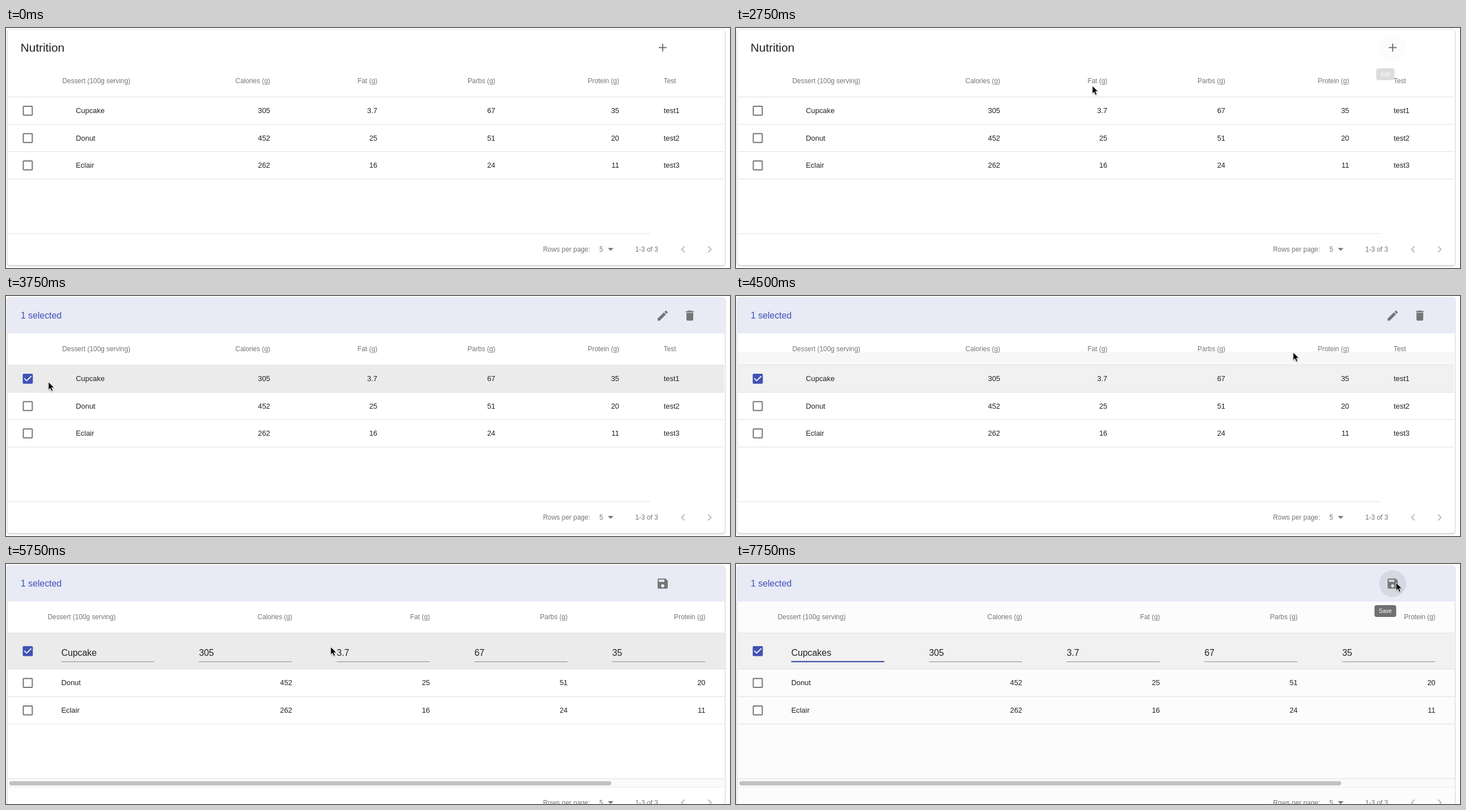
Write an HTML page that moves like this. It is 1280x426 px and loops after 8 s.

```html
<!DOCTYPE html>
<html lang="en">
<head>
<meta charset="utf-8">
<title>Nutrition table</title>
<style>
  html, body { margin: 0; width: 100%; height: 100%; overflow: hidden; background: #fff; }
  svg { display: block; width: 100%; height: 100%; font-family: "Liberation Sans", Arial, sans-serif; }
  .card { filter: drop-shadow(0 1px 1px rgba(0,0,0,.28)); }
  .cursor { filter: drop-shadow(0 1px 1px rgba(0,0,0,.3)); }
</style>
</head>
<body>
<svg id="stage" viewBox="0 0 1280 426"></svg>
<script>
const STEP = 250, STEPS = 32;
const INK = '#212121', MUTED = '#757575', LINE = '#e0e0e0', PRIMARY = '#3f51b5';

const ICONS = {
  add: 'M19 13h-6v6h-2v-6H5v-2h6V5h2v6h6v2z',
  edit: 'M3 17.25V21h3.75L17.81 9.94l-3.75-3.75L3 17.25zM20.71 7.04c.39-.39.39-1.02 0-1.41l-2.34-2.34c-.39-.39-1.02-.39-1.41 0l-1.83 1.83 3.75 3.75 1.83-1.83z',
  remove: 'M6 19c0 1.1.9 2 2 2h8c1.1 0 2-.9 2-2V7H6v12zM19 4h-3.5l-1-1h-5l-1 1H5v2h14V4z',
  save: 'M17 3H5c-1.11 0-2 .9-2 2v14c0 1.1.89 2 2 2h14c1.1 0 2-.9 2-2V7l-4-4zm-5 16c-1.66 0-3-1.34-3-3s1.34-3 3-3 3 1.34 3 3-1.34 3-3 3zm3-10H5V5h10v4z',
  box: 'M19 5v14H5V5h14m0-2H5c-1.1 0-2 .9-2 2v14c0 1.1.9 2 2 2h14c1.1 0 2-.9 2-2V5c0-1.1-.9-2-2-2z',
  checked: 'M19 3H5c-1.11 0-2 .9-2 2v14c0 1.1.89 2 2 2h14c1.11 0 2-.9 2-2V5c0-1.1-.89-2-2-2zm-9 14l-5-5 1.41-1.41L10 14.17l7.59-7.59L19 8l-9 9z',
  drop: 'M7 10l5 5 5-5z',
  prev: 'M15.41 7.41L14 6l-6 6 6 6 1.41-1.41L10.83 12z',
  next: 'M10 6L8.59 7.41 13.17 12l-4.58 4.59L10 18l6-6z'
};

const HEADERS = ['Dessert (100g serving)', 'Calories (g)', 'Fat (g)', 'Parbs (g)', 'Protein (g)', 'Test'];
const ROWS = [
  ['Cupcake', '305', '3.7', '67', '35', 'test1'],
  ['Donut', '452', '25', '51', '20', 'test2'],
  ['Eclair', '262', '16', '24', '11', 'test3']
];
const VIEW = { head: 99.5, name: 123.5, right: [467, 656.5, 865, 1084], top: [122.5, 171, 219.5, 268], test: 1162.7 };
const EDIT = { head: 73.7, name: 97.7, right: [506, 749.5, 993, 1236.5], top: [122.5, 186.5, 235.5, 284] };

// Pointer path: step, x, y
const PATH = [
  [2, 1156, 24], [6, 1131, 40], [7, 1151, 37], [10, 1151, 37], [11, 630, 102.5],
  [13, 46, 150], [14, 40, 148], [15, 75, 152.5], [16, 300, 150], [17, 680, 125],
  [18, 985, 100], [19, 1172, 62], [20, 1203, 42], [21, 1151, 43], [22, 1151, 43],
  [23, 574, 147], [24, 200, 157], [27, 180, 157], [29, 341, 148], [30, 800, 95], [31, 1167, 33]
];

const text = (x, y, size, fill, str, anchor = 'start') =>
  `<text x="${x}" y="${y}" font-size="${size}" fill="${fill}" text-anchor="${anchor}">${str}</text>`;
const rect = (x, y, w, h, fill, extra = '') =>
  `<rect x="${x}" y="${y}" width="${w}" height="${h}" fill="${fill}" ${extra}/>`;
const rule = (x1, x2, y, color = LINE) => rect(x1, y - .5, x2 - x1, 1, color);
const icon = (name, cx, cy, fill = MUTED) =>
  `<path d="${ICONS[name]}" fill="${fill}" transform="translate(${cx} ${cy}) scale(.993) translate(-12 -12)"/>`;
const halo = (cx, opacity = .08) => `<circle cx="${cx}" cy="34.8" r="23.8" opacity="${opacity}"/>`;
const tooltip = (label, width, opacity = 1, y = 73) =>
  `<g opacity="${opacity}">${rect(1148 - width / 2, y, width, 21, '#707070', 'rx="4"')}` +
  text(1148, y + 14, 10, '#fff', label, 'middle') + '</g>';

function pointerAt(step) {
  const i = PATH.findIndex(p => p[0] >= step);
  if (i < 0 || step < PATH[0][0]) return null;
  if (i === 0) return { x: PATH[0][1], y: PATH[0][2] };
  const [s0, x0, y0] = PATH[i - 1], [s1, x1, y1] = PATH[i];
  const k = (step - s0) / (s1 - s0);
  return { x: x0 + (x1 - x0) * k, y: y0 + (y1 - y0) * k };
}

function toolbar(step, selected, editing) {
  if (!selected) {
    const glow = step === 7 ? .05 : step > 7 && step < 11 ? .08 : step === 11 ? .012 : 0;
    return halo(1161, glow) + text(25.8, 42, 20.85, INK, 'Nutrition') + icon('add', 1161, 34.8);
  }
  const bar = '<path d="M2.5 66.5V7a4 4 0 0 1 4-4H1267a4 4 0 0 1 4 4V66.5z" fill="#e8eaf6"/>' +
    text(26, 40, 15.9, PRIMARY, '1 selected');
  if (editing) return bar + (step === 31 ? halo(1161) : '') + icon('save', 1161, 34.8);
  const hover = step === 20 ? halo(1209) : step > 20 ? halo(1161) : '';
  return bar + hover + icon('edit', 1161, 34.8) + icon('remove', 1209, 34.8);
}

function inputs(step, layout) {
  const focused = step >= 25;
  return ROWS[0].slice(0, 5).map((value, i) => {
    const x = layout.name + i * 243.5;
    const active = focused && i === 0;
    const label = i === 0 && step >= 27 ? value + 's' : value;
    const caret = active && step < 30 ? rect(step >= 27 ? 168.6 : 160.6, 148.5, 1, 17.5, INK) : '';
    const underline = active ? rect(x, 172.3, 164.5, 2, '#303f9f') : rule(x, x + 164.5, 173.5, '#8a8a8a');
    return text(x, 162.5, 15.9, INK, label) + underline + caret;
  }).join('');
}

function table(step, selected, editing, pointer) {
  const layout = editing ? EDIT : VIEW;
  const edge = editing ? 1271 : 1269.5;
  const [top, bottom] = layout.top;
  let out = '';

  if (step >= 18 && step <= 22) {
    out += step === 18 ? rect(3, 99, 1266.5, 23, '#f7f7f7')
      : rect(3, 99, 981, 23, '#f7f7f7') + rect(1182, 99, 87.5, 23, '#f7f7f7');
  }
  HEADERS.forEach((label, i) => {
    if (i === 0) out += text(layout.head, 98, 11.9, MUTED, label);
    else if (i < 5) out += text(layout.right[i - 1], 98, 11.9, MUTED, label, 'end');
    else if (!editing) out += text(layout.test, 98, 11.9, MUTED, label);
  });

  const hovered = pointer && pointer.y >= top && pointer.y < bottom;
  if (hovered || selected) out += rect(3, top, edge - 3, bottom - top, hovered ? '#ebebeb' : '#f1f1f1');
  layout.top.forEach(y => out += rule(3, edge, y));

  ROWS.forEach((row, r) => {
    const open = editing && r === 0;
    const cy = (layout.top[r] + layout.top[r + 1]) / 2;
    const checked = selected && r === 0;
    out += icon(checked ? 'checked' : 'box', 38.5, cy + .1, checked ? PRIMARY : MUTED);
    if (open) return out += inputs(step, layout);
    row.forEach((cell, i) => {
      if (i === 0) out += text(layout.name, cy + 4.3, 12.9, INK, cell);
      else if (i < 5) out += text(layout.right[i - 1], cy + 4.3, 12.9, INK, cell, 'end');
      else if (!editing) out += text(layout.test, cy + 4.3, 12.9, INK, cell);
    });
  });
  return out;
}

function footer(editing) {
  const border = editing
    ? rect(3, 381.5, 1268, 14.5, '#fafafa') + rule(3, 1271, 381) + rule(3, 1271, 396, '#ececec') +
      rect(6, 385.5, 1064, 7.5, '#c1c1c1', 'rx="3.75"')
    : rule(3, 1139, 365);
  return border + `<g transform="translate(0 ${editing ? 30.5 : 0})">` +
    text(949.5, 397, 11.9, MUTED, 'Rows per page:') + text(1049, 397, 11.9, MUTED, '5') +
    icon('drop', 1069, 392.5) + text(1112.5, 397, 11.9, MUTED, '1-3 of 3') +
    icon('prev', 1197, 393, '#bdbdbd') + icon('next', 1244, 393, '#bdbdbd') + '</g>';
}

function tooltips(step) {
  if (step >= 7 && step <= 10) return tooltip('Add', 32, step === 7 ? .5 : 1);
  if (step === 11) return tooltip('Add', 32, .24, 71.5);
  if (step === 21 || step === 22) return tooltip('Edit', 32.5);
  return step === 31 ? tooltip('Save', 38.5) : '';
}

function cursor(p) {
  return `<path class="cursor" transform="translate(${p.x} ${p.y})" d="M0 0V14.2L3.2 11.2 5.5 16.6 8 15.5 5.8 10.2H10.2Z" stroke="#fff" stroke-width=".9"/>`;
}

function scene(step) {
  const selected = step >= 14, editing = step >= 23;
  const typing = step === 26 || step === 27;
  const pointer = pointerAt(step);
  const paper = step >= 30 ? '#fcfcfc' : '#fff';
  return rect(2.5, 2.5, 1268.5, editing ? 449 : 418.5, paper, 'rx="4" class="card" stroke="#e6e6e6" stroke-width=".7"') +
    toolbar(step, selected, editing) + table(step, selected, editing, pointer) +
    footer(editing) + tooltips(step) + (pointer && !typing ? cursor(pointer) : '');
}

const stage = document.getElementById('stage');
let shown = -1;
function play() {
  const step = Math.floor(performance.now() / STEP) % STEPS;
  if (step !== shown) stage.innerHTML = scene(shown = step);
  requestAnimationFrame(play);
}
play();
</script>
</body>
</html>
```
